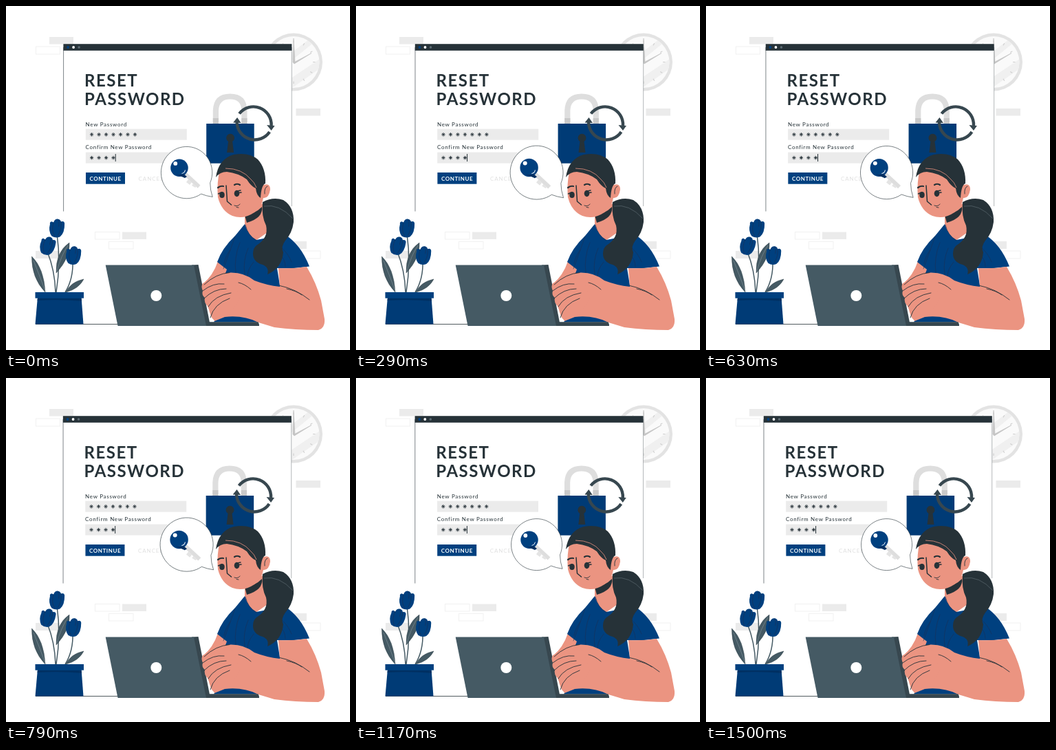
An HTML page for the animation above (1.54 s loop, 500 px wide and 500 px high).

```html
<!DOCTYPE html>
<html lang="en">
<head>
<meta charset="utf-8">
<title>Reset password</title>
<style>
  html, body { margin: 0; width: 100%; height: 100%; overflow: hidden; background: #fff; }
  svg { display: block; width: 100vw; height: 100vh; }
  text { font-family: Lato, sans-serif; fill: #263238; }
  .blue { fill: #00407f; }
  .deep { fill: #003b76; }
  .dark { fill: #263238; }
  .skin { fill: #eb9481; }
  .pale { fill: #ebebeb; }
  .box { fill: #fff; stroke: #f1f1f1; }
  .line { fill: none; stroke: #263238; stroke-width: .9; stroke-linecap: round; stroke-linejoin: round; }
  .bold { stroke-width: 1.5; }
  .fold { fill: none; stroke: #1b2f55; stroke-width: .6; stroke-linecap: round; }
  .leaf { fill: #455a64; stroke: #37474f; stroke-width: .5; }
  .stem { fill: none; stroke: #455a64; stroke-width: 1.5; }
  .ring { fill: none; stroke: #37474f; stroke-width: 4.4; }
  .head { font-size: 24px; font-weight: 700; letter-spacing: 1.5px; }
  .label { font-size: 8px; letter-spacing: .7px; }
  .btn { font-size: 8px; font-weight: 700; letter-spacing: .55px; }
</style>
</head>
<body>
<svg viewBox="0 0 500 500">
  <defs>
    <path id="star" d="M-2.7 0H2.7M0 -2.8V2.8M-1.9 -1.9L1.9 1.9M1.9 -1.9L-1.9 1.9" stroke="#263238" stroke-width=".9"/>
    <g id="tulip">
      <path class="blue" d="M-10 -5Q-11 -8 -8 -9L-5 -8Q-4 -13.500 1 -13.500Q5 -13 5.500 -10Q10 -12 11 -8Q12.500 6 6 12Q0 15 -6 12Q-12 5 -10 -5Z"/>
      <path class="fold" d="M-5 -8Q-8 4 -2 11M5.500 -10Q8 0 3 10M1 -13Q4 -9 3 -3"/>
    </g>
    <clipPath id="dial"><circle cx="418" cy="81.5" r="37.500"/></clipPath>
  </defs>

  <g id="back">
    <rect class="pale" x="63" y="45" width="35" height="10.5"/>
    <rect class="box" x="43.5" y="59" width="35" height="11"/>
    <rect class="pale" x="421.5" y="149" width="35.5" height="10.5"/>
    <rect class="box" x="129.500" y="328.500" width="35.5" height="10.5"/>
    <rect class="pale" x="169" y="328.500" width="35" height="10.5"/>
    <rect class="box" x="149.500" y="342.500" width="35.5" height="10.5"/>
    <rect class="pale" x="43" y="356" width="35" height="11"/>
    <rect class="pale" x="402" y="342" width="35" height="11"/>
    <rect class="box" x="421.500" y="356" width="35.5" height="11"/>
    <circle cx="418" cy="81.5" r="42" fill="#e3e3e3"/>
    <circle cx="418" cy="81.5" r="37.500" fill="#fafafa"/>
    <g clip-path="url(#dial)">
      <path d="M383 126L459 75V89L397 132ZM377 97L449 42L455 47L383 105Z" fill="#f0f0f0"/>
      <g id="ticks" stroke="#cfcfcf" stroke-width="1.2"></g>
    </g>
    <path d="M418 47L420 82H417ZM417.500 82.500L444 68.500L419 84Z" fill="#c4c4c4" stroke="#c4c4c4" stroke-width=".7"/>
  </g>

  <g id="win">
    <rect x="83.800" y="55" width="332" height="244" fill="#fff"/>
    <path d="M84 60V298.500" stroke="#263238" stroke-width=".6"/>
    <path d="M415.700 60V291" stroke="#263238" stroke-width=".35"/>
    <rect class="dark" x="83.800" y="55.200" width="332" height="9.600"/>
    <circle class="blue" cx="90.500" cy="60" r="1.900"/>
    <circle cx="98.500" cy="60" r="1.900" fill="#fff"/>
    <circle cx="106.500" cy="60" r="1.800" fill="#5b6a72"/>
    <text class="head" x="114.500" y="117">RESET</text>
    <text class="head" x="114.500" y="144">PASSWORD</text>
    <text class="label" x="116" y="174.500">New Password</text>
    <text class="label" x="116" y="208">Confirm New Password</text>
    <rect class="pale" x="116.200" y="178.700" width="147" height="16"/>
    <rect class="pale" x="116.200" y="212.600" width="147" height="16"/>
    <g id="stars"></g>
    <path d="M159.600 215V226" stroke="#263238"/>
    <rect class="blue" x="116.400" y="242" width="57" height="16.700"/>
    <text class="btn" x="122" y="253.700" style="fill:#fff">CONTINUE</text>
    <text class="btn" x="193" y="253.700" style="fill:#e0e0e0;font-weight:400;letter-spacing:.9px">CANCEL</text>

    <path d="M305.300 172V152Q306 131.500 326 131.500Q346.500 131.500 346.800 152V172" fill="none" stroke="#dedede" stroke-width="8.200"/>
    <path d="M301.200 163H309.400V171H301.200ZM342.700 163H350.900V171H342.700Z" fill="#c9c9c9"/>
    <rect class="deep" x="291.600" y="171" width="69.500" height="57.700"/>
    <path class="dark" d="M323.500 197A6 6 0 1 1 329.500 197L331.500 213H321.500Z"/>
    <path class="ring" d="M339.500 156.500A26 26 0 0 1 386 174"/>
    <path class="ring" d="M336 169A26 26 0 0 0 383.500 183"/>
    <path d="M379.500 173L391 174L386 181ZM330.500 169.500L336.500 162L342 170Z" fill="#37474f"/>
  </g>

  <g id="bubble">
    <path d="M296.500 257A37 37.500 0 1 0 283.500 273Q291 276 300 277.300Q296.500 267 296.500 257Z" fill="#fff" stroke="#263238" stroke-width=".6"/>
    <path d="M260 243.500L280.500 262.500" stroke="#dedede" stroke-width="5.600"/>
    <path d="M265 252L262 256L267 260L270 256M272 258L270 261L275 264L277 262" fill="#e4e4e4"/>
    <circle class="blue" cx="252" cy="235.200" r="12.700"/>
    <path d="M242 242Q250 247 258 244L263 248L260 250Z" fill="#002f61"/>
    <path d="M260.500 238.500Q259.500 243 255.500 243.500" fill="none" stroke="#e8eef5" stroke-width="1"/>
    <circle cx="246.300" cy="229" r="2.900" fill="#fff"/>
  </g>

  <g id="woman">
    <path class="skin" d="M347 298L376 286Q376 310 383 327L360 343Q349 335 347 317Z"/>
    <path class="dark" d="M347 304Q362 302 372 292Q374 308 350 315Z"/>
    <path class="skin" d="M308 371L322 384L318 400L292 424L286 404Q301 392 308 371Z"/>
    <path class="blue" d="M347 317Q352 334 364 340L405 332Q428 346 441 378.500Q418 382 394 381L399 412H350L316 396L321 383L307 372Q314 352 333 334Z"/>
    <path class="blue" d="M302 459.500Q312 440 340 440L372 459.500Z"/>
    <path class="fold" d="M348 318Q352 335 364 341M333 335Q322 366 316 382M340 344Q331 366 334 388M352 352Q344 370 347 390M360 372Q350 384 351 395M399 350Q410 359 415 372M398 362Q406 367 406 379M326 354Q318 366 317 374"/>
    <path class="skin" d="M292 412Q302 389 326 387.500Q346 387 361 399Q379 406 398 408L396 381Q418 382 437 379Q451 402 458 428L463 455Q464 468 454 471Q420 471 390 467L367 460Q345 449 318 452L303 458L292 434Z"/>
    <path class="line" d="M398 406.500Q421 411 441 427M408 411Q422 414 430 420"/>
    <path class="skin" d="M311 237Q306 257 308 278Q313 298 329 305Q345 311 361 300Q372 293 374 279Q382 280 384 267Q384 257 375 260L368 235Z"/>
    <path class="dark" d="M305 249Q309 222 331 216Q353 212 366 223Q378 236 377 258Q371 260 370 279Q364 275 363 265Q356 262 350 252Q338 243 321 241Q311 241 305 249Z"/>
    <path d="M319 236Q343 236 356 252Q361 256 364 264" fill="none" stroke="#eb9481" stroke-width=".8"/>
    <path class="line" d="M380 262Q375 264 376 273"/>
    <path class="line bold" d="M320 261L321.500 284L327.500 289"/>
    <path class="line" d="M332 290Q337 292 340 288M335 292.500L338 293"/>
    <path class="line bold" style="stroke-width:2.200" d="M308 264Q312 261 316 262M332 260Q336 257.500 340 260"/>
    <ellipse class="dark" cx="314" cy="274.500" rx="3.700" ry="4.500"/>
    <ellipse class="dark" cx="335.500" cy="272.500" rx="3.800" ry="4.700"/>
    <path class="line bold" d="M308.500 273L313 271M336 269L341 268M338 271.500L342 271"/>
    <path class="dark" d="M373 285Q388 277 403 282Q419 292 418 314Q416 330 406 341Q399 350 403 358Q401 381 380 390Q383 380 373 376Q359 372 359 360Q359 352 364 348Q382 337 378 319Q371 305 373 285Z"/>
    <path d="M375 291Q397 287 417 309" fill="none" stroke="#66727a" stroke-width=".6"/>
  </g>

  <g id="desk">
    <path d="M43 462.500H300" stroke="#263238" stroke-width=".8"/>
    <path d="M288 459.300H365Q368 459.300 368 465H288Z" fill="#37474f"/>
    <path d="M270 376.500L279.500 376L297 465H286Z" fill="#37474f"/>
    <path d="M144.700 376.500H273L291 465H162.500Z" fill="#455a64"/>
    <circle cx="218.300" cy="421" r="8" fill="#fff"/>
    <path class="skin" d="M286 403Q293 400 300 397L330 396L340 425L324 449L303 456Q298 456 294 437Q287 431 289 424Q284 420 286 414Q283 407 286 403Z"/>
    <path class="line" d="M286 414Q301 402 317 404M288 425Q302 411 320 411M294 437Q303 421 327 417M297 453Q302 433 325 425M288 405Q305 389 325 387.500M338 402Q347 404 356 412"/>
  </g>

  <g id="plant">
    <path class="stem" d="M74 331Q80 372 73 416M60 357Q71 384 72 416M97 370Q98 397 86 416"/>
    <path class="leaf" d="M57 416Q37 395 37.500 364Q55 381 57 416ZM73 388Q72 358 92 344Q94 365 73 388ZM87 416Q94 401 113 397Q106 411 87 416Z"/>
    <path d="M40 370Q48 390 57 414M90 348Q80 363 74 385" fill="none" stroke="#90a0a8" stroke-width=".5"/>
    <use href="#tulip" transform="translate(73.500 323) rotate(5)"/>
    <use href="#tulip" transform="translate(60 348.500) rotate(14)"/>
    <use href="#tulip" transform="translate(97.500 362.500) rotate(6)"/>
    <path class="deep" d="M46 423H109.500L112.500 462.500H42.500Z"/>
    <path d="M46 425H109.500L110 429Q80 426 45.500 428Z" fill="#003063"/>
    <rect class="blue" x="42.500" y="416" width="70.500" height="8.700"/>
  </g>
</svg>
<script>
const $ = id => document.getElementById(id);
const LOOP = 1540, FRAMES = 37;

const row = (n, y) => Array.from({ length: n }, (_, i) =>
  `<use href="#star" x="${125 + i * 10.48}" y="${y}"/>`).join('');
$('stars').innerHTML = row(7, 186.8) + row(4, 220.6);
$('ticks').innerHTML = Array.from({ length: 12 }, (_, i) =>
  `<path d="M418 50V53.500" transform="rotate(${i * 30} 418 81.5)"/>`).join('');

function bezier(x1, y1, x2, y2) {
  const at = (a, b, s) => 3 * a * s * (1 - s) ** 2 + 3 * b * s * s * (1 - s) + s ** 3;
  return x => {
    let lo = 0, hi = 1;
    for (let i = 0; i < 20; i++) {
      const mid = (lo + hi) / 2;
      if (at(x1, x2, mid) < x) lo = mid; else hi = mid;
    }
    return at(y1, y2, lo);
  };
}

// Steps are [time, value] pairs, each span eased on its own.
function track(steps, ease) {
  return t => {
    const i = steps.findIndex(s => s[0] > t);
    if (i < 0) return steps[steps.length - 1][1];
    const [t0, a] = steps[i - 1], [t1, b] = steps[i];
    return a + (b - a) * ease((t - t0) / (t1 - t0));
  };
}

const shake = track([-0.4, -1, 2, -4, 4, -4, 4, -4, 2, -1, 0].map((x, i) => [i * 150, x]),
  bezier(.36, .07, .19, .97));
const beat = track([[0, 1.005], [80, 1], [290, 1.04], [500, 1], [710, 1.045], [1130, 1]],
  bezier(.42, 0, .58, 1));

function draw(now) {
  // The motion advances on a 24 per second grid.
  const k = Math.floor((now % LOOP) / LOOP * FRAMES + .06) % FRAMES;
  const t = k * 1000 / 24;
  $('win').setAttribute('transform', `translate(${shake(t).toFixed(3)} 0)`);
  $('bubble').setAttribute('transform',
    `translate(262 242) scale(${beat(t).toFixed(4)}) translate(-262 -242)`);
}

let start;
function tick(now) {
  start ??= now;
  draw(now - start);
  requestAnimationFrame(tick);
}
draw(0);
requestAnimationFrame(tick);
</script>
</body>
</html>
```
